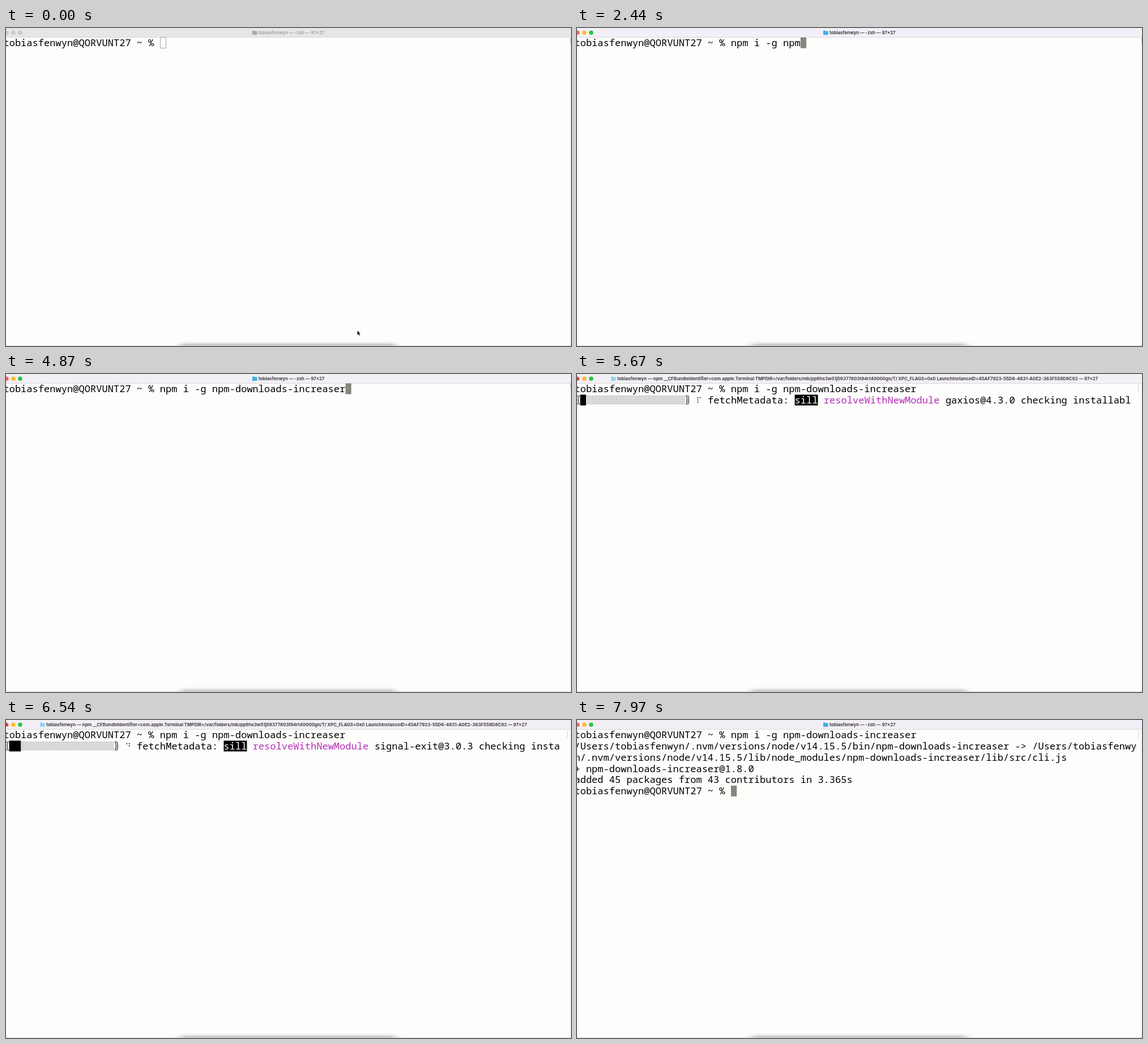
An HTML page for the animation above (8 s loop, 998 by 561 pixels).

```html
<!DOCTYPE html>
<html lang="en">
<head>
<meta charset="utf-8">
<title>Terminal</title>
<style>
  html, body { margin: 0; width: 100%; height: 100%; overflow: hidden; background: #fdfdfc; }
  svg { display: block; width: 998px; height: 561px; }
  text { white-space: pre; }
  #screen text { font: 17.07px "Noto Sans Mono", "DejaVu Sans Mono", monospace; }
  #title { font: 700 7.8px Inter, "Open Sans", sans-serif; }
</style>
</head>
<body>
<svg viewBox="0 0 998 561">
  <defs>
    <pattern id="shade" width="3" height="3" patternUnits="userSpaceOnUse">
      <path d="M0 0h1v1h-1zM1.5 1.5h1v1h-1z" fill="#555"/>
    </pattern>
    <filter id="soft" x="-20%" y="-300%" width="140%" height="700%">
      <feGaussianBlur stdDeviation="7 3.2"/>
    </filter>
  </defs>
  <rect width="998" height="561" fill="#fdfdfc"/>
  <path d="M996.8 17V561" stroke="#e9e9e8"/>
  <rect id="bar" width="998" height="16.5"/>
  <path d="M0 16.5H998" stroke="#dad8db"/>
  <g id="lights">
    <circle cx="0.8" cy="8.3" r="3.8"/>
    <circle cx="13" cy="8.3" r="3.8"/>
    <circle cx="25" cy="8.3" r="3.8"/>
  </g>
  <circle id="busy" cx="0.8" cy="8.3" r="1.5" fill="#8c1a12"/>
  <path id="folder" d="M0 0h3.2l1 1H8.6V7.6H0z"/>
  <text id="title" y="11"></text>
  <path id="scroll" stroke="#aaa"/>
  <g id="screen"></g>
  <rect x="308" y="558" width="380" height="12" fill="#777" opacity=".65" filter="url(#soft)"/>
  <path d="M0 560.5H998" stroke="#d4d4cc"/>
  <path id="mouse" d="M620.5 533.5v8.6l2-1.8 1.3 3 1.4-.6-1.3-2.9h2.7z" fill="#000" stroke="#fff" stroke-width=".5"/>
</svg>
<script>
const LOOP = 8000;
const CW = 10.242, X0 = -4.6, ROW = 19.85, COLS = 97;
const FOCUS = 520, TYPE = 760, ENTER = 5000, FETCH = 5300, LINKED = 7250, DONE = 7600;

const user = 'tobiasfenwyn';
const prompt = user + '@QORVUNT27 ~ % ';
const command = 'npm i -g npm-downloads-increaser';
const node = `/Users/${user}/.nvm/versions/node/v14.15.5`;
const link = `${node}/bin/npm-downloads-increaser -> ${node}/lib/node_modules/npm-downloads-increaser/lib/src/cli.js`;
const summary = ['+ npm-downloads-increaser@1.8.0', 'added 45 packages from 43 contributors in 3.365s'];
const idleTitle = user + ' — -zsh — 97×27';
const busyTitle = user + ' — npm __CFBundleIdentifier=com.apple.Terminal ' +
  'TMPDIR=/var/folders/mb/pp9hx3w51j59377803t94rt40000gn/T/ XPC_FLAGS=0x0 ' +
  'LaunchInstanceID=45AF7923-55D6-4831-A0E2-363F559D8C92 — 97×27';

// [start time, package]
const packages = [
  [FETCH, 'yargs@16.2.0'], [5480, 'axios@0.21.1'], [5620, 'gaxios@4.3.0'],
  [5860, 'is-stream@2.0.0'], [6080, 'node-fetch@2.6.1'], [6300, 'execa@5.0.0'],
  [6500, 'signal-exit@3.0.3']
];
const spinner = '⠋⠙⠹⠸⠼⠴⠦⠧⠇⠏';

const $ = id => document.getElementById(id);
const colX = c => X0 + c * CW;
const esc = s => s.replace(/&/g, '&amp;').replace(/</g, '&lt;').replace(/>/g, '&gt;');
const write = (row, col, s, fill = '#000') =>
  `<text x="${colX(col)}" y="${32 + row * ROW}" fill="${fill}">${esc(s)}</text>`;
const block = (row, col, cells, fill) =>
  `<rect x="${colX(col)}" y="${16.6 + row * ROW}" width="${cells * CW}" height="19" fill="${fill}"/>`;
const caret = (row, col, active) => active
  ? block(row, col, 1, '#868680')
  : `<rect x="272.5" y="16.5" width="10" height="19" fill="none" stroke="#a5a5a5"/>`;

function typedCount(t) {
  if (t < TYPE) return 0;
  const n = t < 3225 ? 1 + (t - TYPE) / 145 : 18 + (t - 3225) / 112;
  return Math.min(command.length, Math.floor(n));
}

function braille(row, col, glyph) {
  const bits = glyph.charCodeAt(0) - 0x2800;
  let out = '';
  for (let i = 0; i < 6; i++) {
    if (bits >> i & 1) {
      const x = colX(col) + (i < 3 ? 3 : 7.2), y = 41.8 + (row - 1) * ROW + (i % 3) * 4;
      out += `<circle cx="${x}" cy="${y}" r=".95"/>`;
    }
  }
  return out;
}

function bracket(row, x, dir) {
  const y = 37.5 + (row - 1) * ROW;
  const arc = d => `M${x + d * dir} ${y}q${4 * dir} 8 0 16.5`;
  return `<path d="${arc(0)}${arc(3)}" fill="none" stroke="#000" stroke-width="1.1"/>`;
}

function progress(row, t) {
  const done = t < 6000 ? 1 : 2;
  const tick = Math.floor((t - 5634) / 72.5) + 9;
  const name = packages.filter(p => p[0] <= t).pop()[1];
  const status = (name + ' checking installable status').slice(0, 32);
  const top = 37.5 + (row - 1) * ROW;
  return `<rect x="${colX(1)}" y="${top}" width="${18 * CW}" height="16.5" fill="url(#shade)"/>` +
    block(row, 1, done, '#000') +
    bracket(row, 4, -1) + bracket(row, 192.5, 1) +
    braille(row, 21, spinner[(tick + 20) % 10]) +
    write(row, 23, 'fetchMetadata:') +
    block(row, 38, 4, '#000') + write(row, 38, 'sill', '#fff') +
    write(row, 43, 'resolveWithNewModule', '#b52fb5') +
    write(row, 64, status);
}

function screen(t) {
  const n = typedCount(t);
  let out = '';
  if (t < ENTER) out += caret(0, prompt.length + n, t >= FOCUS);
  out += write(0, 0, prompt + command.slice(0, n));
  if (t >= LINKED) out += write(1, 0, link.slice(0, COLS)) + write(2, 0, link.slice(COLS));
  if (t >= DONE) {
    summary.forEach((s, i) => out += write(3 + i, 0, s));
    out += caret(5, prompt.length, true) + write(5, 0, prompt);
  } else if (t >= FETCH) {
    out += progress(t < LINKED ? 1 : 3, t);
  } else if (t >= ENTER) {
    out += caret(1, 0, true);
  }
  return out;
}

function chrome(t) {
  const active = t >= FOCUS, busy = t >= ENTER && t < DONE;
  const x = busy ? 71 : 446;
  $('bar').setAttribute('fill', active ? '#f3eff7' : '#e8e5e7');
  const colors = active ? ['#fe5f57', '#febc2e', '#28c840'] : ['#cbc8c9', '#cbc8c9', '#cbc8c9'];
  [...$('lights').children].forEach((c, i) => c.setAttribute('fill', colors[i]));
  $('busy').setAttribute('opacity', busy ? 1 : 0);
  $('folder').setAttribute('transform', `translate(${x - 11} 4.4)`);
  $('folder').setAttribute('fill', !active ? '#aaa9aa' : busy ? '#93d3ee' : '#3fb1e6');
  $('title').setAttribute('x', x);
  $('title').setAttribute('fill', active ? '#403e42' : '#a9a6a8');
  $('title').textContent = busy ? busyTitle : idleTitle;
  $('scroll').setAttribute('d', t < ENTER ? 'M997.5 17V26' : 'M991.5 19V32');
  $('scroll').setAttribute('stroke-dasharray', t < ENTER ? 'none' : '1 1');
  $('mouse').setAttribute('opacity', t < TYPE ? 1 : 0);
}

let last = '';
function render(t) {
  chrome(t);
  const next = screen(t);
  if (next !== last) $('screen').innerHTML = last = next;
}

const start = performance.now();
function frame() {
  render((performance.now() - start) % LOOP);
  requestAnimationFrame(frame);
}
frame();
</script>
</body>
</html>
```
